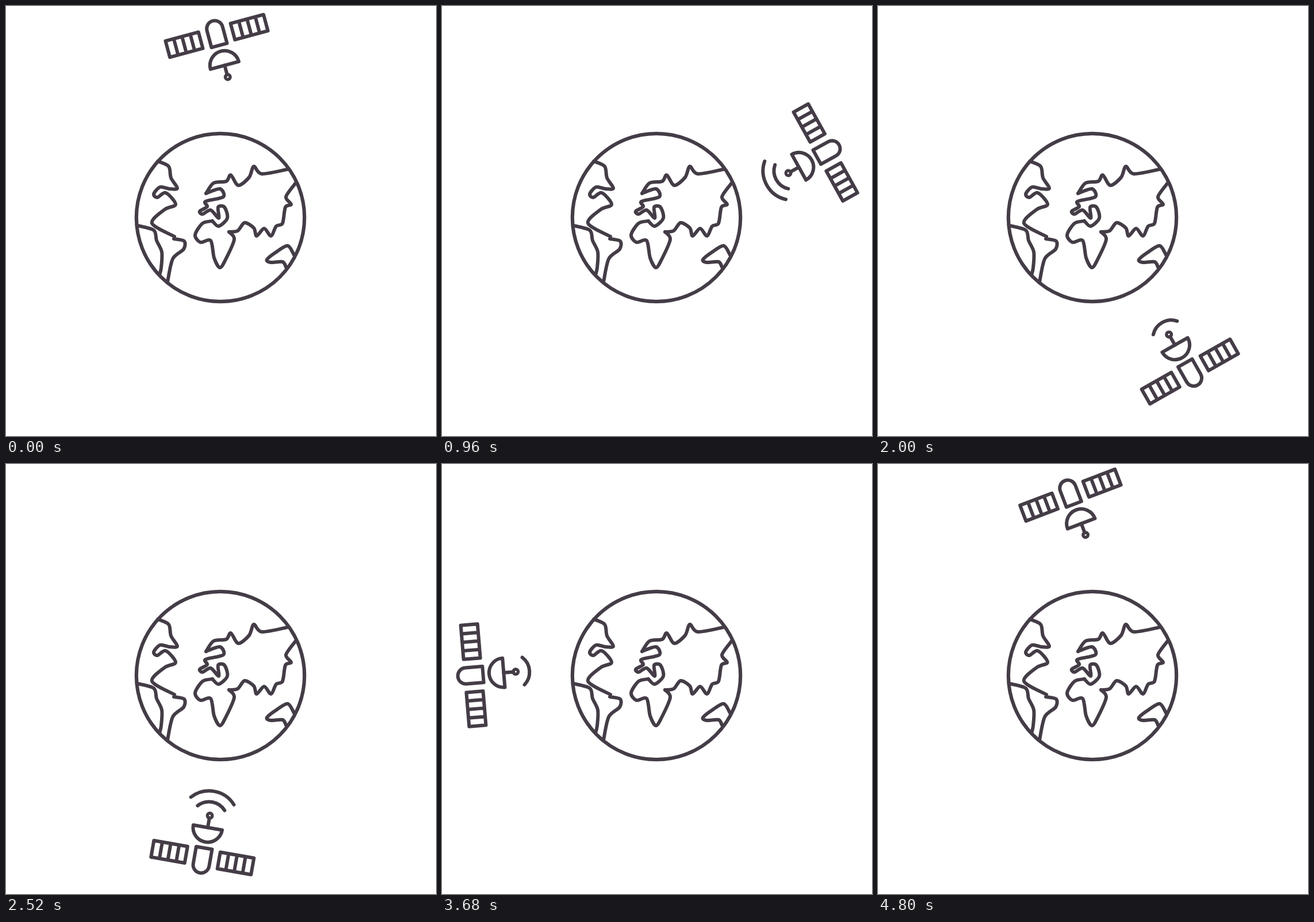
Recreate the animation shown at these times as an HTML page. Size 748 px wide and 748 px high, loop 4.84 s.

```html
<!DOCTYPE html>
<html lang="en">
<head>
<meta charset="utf-8">
<title>Satellite orbit</title>
<style>
html, body { margin: 0; width: 100%; height: 100%; overflow: hidden; background: #fff; }
svg { display: block; width: 100vw; height: 100vh; }
</style>
</head>
<body>
<svg viewBox="0 0 748 748" fill="none" stroke="#443c46" stroke-width="6" stroke-linecap="round" stroke-linejoin="round">
  <circle cx="373" cy="368" r="146.2" stroke-width="6.2"/>
  <g id="land"></g>
  <g id="sat">
    <path d="M-14 17V-13A14 14 0 0 1 14 -13V17Z"/>
    <path d="M-25.5 53A25.5 25.5 0 0 1 25.5 53Z"/>
    <path d="M0 53V70"/>
    <circle cy="74" r="4.3" stroke-width="5.4"/>
  </g>
</svg>
<script>
const NS = 'http://www.w3.org/2000/svg';
const FRAME = 40, LOOP = 4840, TURN = 122, PULSE = 38;
const CENTER = { x: 371.5, y: 369 }, ORBIT = 317;
const land = document.getElementById('land');
const sat = document.getElementById('sat');

function addPath(parent, d) {
  const p = document.createElementNS(NS, 'path');
  p.setAttribute('d', d);
  return parent.appendChild(p);
}

// Smooth open curve through "x,y x,y ..."
function curve(text) {
  const pts = text.split(' ').map(s => s.split(',').map(Number));
  const at = i => pts[Math.max(0, Math.min(pts.length - 1, i))];
  const handle = (p, a, b, k) => p.map((v, j) => v + (b[j] - a[j]) * k);
  let d = 'M' + pts[0];
  for (let i = 0; i < pts.length - 1; i++) {
    const a = at(i), b = at(i + 1);
    d += 'C' + handle(a, at(i - 1), b, .15) + ' ' + handle(b, a, at(i + 2), -.15) + ' ' + b;
  }
  return d;
}

const coasts = {
  northAmerica: '264,270 283,279 287,299 298,317 284,318 268,315 257,327 263,333 278,325 295,345 276,354 254,378 293,401',
  southAmericaEast: '292,405 310,409 309,423 290,440 281,480',
  southAmericaWest: '229,382 257,390 262,408 271,428 270,455 267,468',
  arctic: '490,284 445,292 431,279 423,298 404,312 391,294 383,305 361,308 348,326',
  europe: '348,326 372,318 378,332 347,340 350,349 337,357 342,362 356,355 370,369 369,350 380,350 385,369 370,383 359,374',
  africa: '359,374 342,378 329,398 338,411 356,408 362,438 372,455 382,441 397,406 388,393',
  asia: '388,393 403,391 415,377 431,386 436,400 449,387 461,400 470,383 481,378 486,350 496,345 487,332 503,309',
  australia: '501,433 490,417 470,428 454,441 460,446 481,445 487,454'
};
Object.values(coasts).forEach(c => addPath(land, curve(c)));

function addPanel(left) {
  const width = 59.4, top = -14.6, height = 29.2;
  let d = `M${left} ${top}h${width}v${height}h${-width}Z`;
  for (let i = 1; i < 4; i++) d += `M${left + width * i / 4} ${top}v${height}`;
  addPath(sat, d);
}
addPanel(-88.3);
addPanel(28.9);

// Concentric signal arcs below the dish
const waves = [0, 1, 2].map(i => {
  const r = 32 + 19 * i, half = .84;
  const dx = r * Math.sin(half), y = 66 + r * Math.cos(half);
  return addPath(sat, `M${-dx} ${y}A${r} ${r} 0 0 0 ${dx} ${y}`);
});

function draw(time) {
  const n = Math.floor((time % LOOP) / FRAME);
  const phase = 2 * Math.PI * n / TURN;
  const wobble = -2 * Math.sin(1.7 * phase) * Math.exp(-phase / 2.5);
  const angle = -.9 + 360 * n / TURN + wobble;
  const tilt = -4.8 - 9.4 * Math.cos(phase);
  const a = angle * Math.PI / 180;
  const x = CENTER.x + ORBIT * Math.sin(a), y = CENTER.y - ORBIT * Math.cos(a);
  sat.setAttribute('transform', `translate(${x} ${y}) rotate(${angle + tilt})`);
  const lit = Math.floor((n % PULSE) / (PULSE / 4));
  waves.forEach((w, i) => w.setAttribute('visibility', i < lit ? 'visible' : 'hidden'));
}

function tick() {
  draw(performance.now());
  requestAnimationFrame(tick);
}
tick();
</script>
</body>
</html>
```
